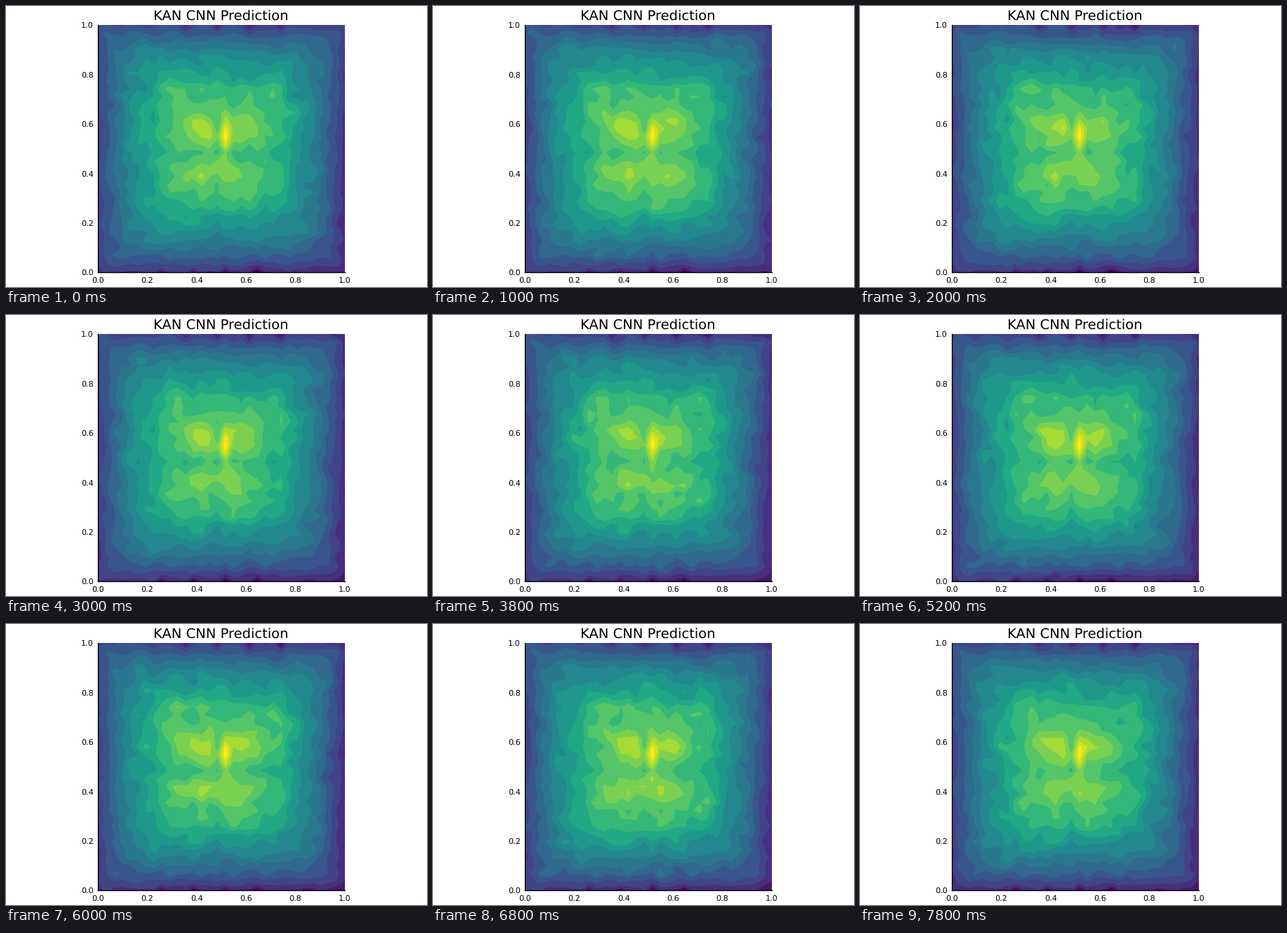
Write a matplotlib script that moves like this. It is 600 px wide and 400 px high and loops after 8 s.

```python
import numpy as np
import matplotlib.pyplot as plt
from matplotlib.animation import FuncAnimation

W, H, DPI = 600, 400, 100
LEFT, TOP, SIDE = 131, 27, 352
N, BANDS = 32, 16
FRAMES, STEP = 40, 200

plt.rcParams.update({"font.family": "DejaVu Sans", "text.hinting": "none"})

axis = np.linspace(0, 1, N)
col, row = np.meshgrid(np.arange(N), np.arange(N))


def soft_min(a, b, k=3):
    a, b = np.maximum(a, 1e-3), np.maximum(b, 1e-3)
    return (a ** -k + b ** -k) ** (-1 / k)


def hill(c, r, width, height):
    return np.exp(-((col - c) / width) ** 2 - ((row - r) / height) ** 2)


def noise(rng):
    """Random grid whose neighbouring points are slightly alike."""
    n = rng.normal(size=(N, N))
    return n + .35 * np.roll(n, 1, axis=0) + .35 * np.roll(n, 1, axis=1)


def make_base():
    x, y = col / (N - 1), row / (N - 1)
    z = .19 - .05 * x + .06 * y
    z += .68 * soft_min(np.sin(np.pi * x), np.sin(np.pi * y))

    # Raised square plateau with four lobes, split by a shallow valley.
    inner = (abs(col - 15.5) < 8) & (abs(row - 15.5) < 8)
    z += .03 * inner
    for c, height in ((13, .09), (18, .06)):
        for r in (12.5, 18):
            z += height * hill(c, r, 2.5, 1.8)
    z -= .05 * inner * np.exp(-(row - 15.0) ** 2)
    z -= .12 * hill(15, 18.5, .6, 1.5)

    # Fringe teeth recur every fourth column.
    z[2, 9:22:4] += .08
    z[0, 8:21:4] -= .12
    z[31, 11:24:4] -= .13
    z[30, 11:24:4] -= .05
    return z


base = make_base()
grain = .012 + .012 * base
base += grain * noise(np.random.default_rng(7))
summit = hill(16, 17, .6, 1.9)


def surface(i):
    rng = np.random.default_rng(100 + i)
    z = base + .8 * grain * noise(rng) * (1 - summit)
    return z + (.24 + .02 * rng.uniform(-1, 1)) * summit


colors = plt.get_cmap("viridis")(np.linspace(0, 1, BANDS))

fig = plt.figure(figsize=(W / DPI, H / DPI), dpi=DPI, facecolor="white")
ax = fig.add_axes([LEFT / W, 1 - (TOP + SIDE) / H, SIDE / W, SIDE / H],
                  facecolor=colors[0])
fig.text((LEFT + SIDE / 2 - .5) / W, 380.5 / H, "KAN CNN Prediction",
         size=14, ha="center", va="baseline")

ticks = np.linspace(0, 1, 6)
labels = [f"{t:.1f}" for t in ticks]
ax.set_xticks(ticks, labels)
ax.set_yticks(ticks, labels)
ax.tick_params(length=0, pad=4.5, labelsize=8)
ax.spines[["top", "right"]].set_visible(False)
ax.spines[["left", "bottom"]].set_linewidth(1)


def draw(i):
    for old in list(ax.collections):
        old.remove()
    z = surface(i)
    # Bands span each frame's own range; stacked fills leave no seams.
    levels = np.linspace(z.min(), z.max(), BANDS + 1)
    for low, color in zip(levels[1:-1], colors[1:]):
        ax.contourf(axis, axis, z, levels=[low, 9], colors=[color], antialiased=True)
    ax.set(xlim=(0, 1), ylim=(0, 1))
    return ax.collections


anim = FuncAnimation(fig, draw, frames=FRAMES, init_func=lambda: draw(0),
                     interval=STEP, repeat=True, repeat_delay=0, blit=False)
plt.show()
```
